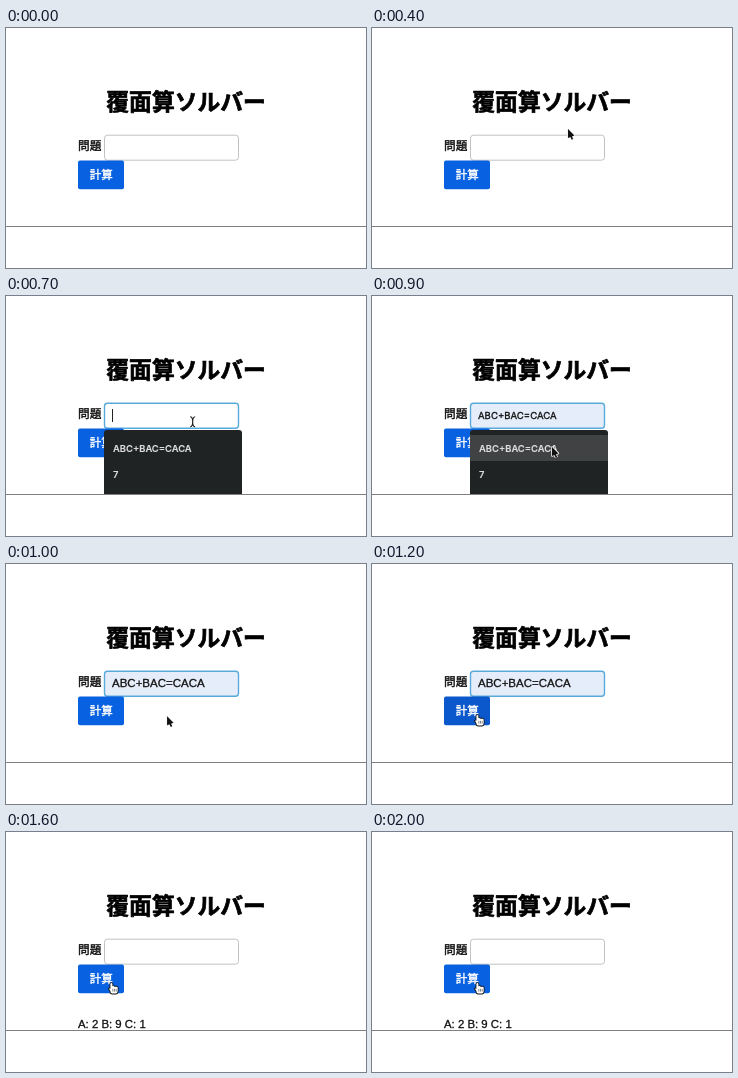
Animation of 360 by 240 pixels, one loop 2100 ms. Source, as an HTML page with a canvas:

```html
<!DOCTYPE html>
<html lang="ja">
<head>
<meta charset="utf-8">
<style>
html, body { margin: 0; width: 100%; height: 100%; overflow: hidden; background: #fff; }
canvas { display: block; width: 360px; height: 240px; }
</style>
</head>
<body>
<canvas id="stage"></canvas>
<script>
const LOOP = 2100, STEP = 100;
const canvas = document.getElementById('stage');
const ctx = canvas.getContext('2d');
const ratio = window.devicePixelRatio || 1;
canvas.width = 360 * ratio;
canvas.height = 240 * ratio;

const CJK = '"Noto Sans CJK JP", "Noto Sans CJK", sans-serif';
const ARIAL = '"Liberation Sans", Arial, sans-serif';
const UI = 'Inter, sans-serif';
const PUZZLE = 'ABC+BAC=CACA';

// the pointer rests at each stop
const stops = [
  { t: 100, x: 304, y: 138 },
  { t: 400, x: 196, y: 101 },
  { t: 600, x: 189, y: 117 },
  { t: 900, x: 180, y: 151 },
  { t: 1200, x: 107, y: 156 }
];
const ease = k => k * k * (3 - 2 * k);

function pointerAt(t) {
  const i = stops.findIndex(s => s.t > t);
  if (i < 0) return stops[stops.length - 1];
  if (i === 0) return null;
  const a = stops[i - 1], b = stops[i];
  const k = ease((t - a.t) / (b.t - a.t));
  return { x: a.x + (b.x - a.x) * k, y: a.y + (b.y - a.y) * k };
}

// a thin outline thickens the letters
function text(str, x, y, font, color, bold = 0) {
  ctx.font = font;
  ctx.fillStyle = ctx.strokeStyle = color;
  ctx.lineJoin = 'round';
  ctx.lineWidth = bold;
  if (bold) ctx.strokeText(str, x, y);
  ctx.fillText(str, x, y);
}

function box(x, y, w, h, r, fill, stroke, line = 1) {
  ctx.beginPath();
  ctx.roundRect(x, y, w, h, r);
  ctx.fillStyle = fill;
  ctx.fill();
  if (!stroke) return;
  ctx.strokeStyle = stroke;
  ctx.lineWidth = line;
  ctx.stroke();
}

function arrow() {
  const body = new Path2D('M0 0V9L6.4 6.4Z');
  const tail = new Path2D('M2.4 6L4.4 10.4');
  ctx.lineJoin = 'round';
  for (const [color, grow] of [['#fff', 1.6], ['#111', 0]]) {
    ctx.strokeStyle = ctx.fillStyle = color;
    ctx.lineWidth = 1.7 + grow;
    ctx.stroke(tail);
    ctx.lineWidth = grow || 0.1;
    ctx.stroke(body);
    ctx.fill(body);
  }
}

function beam() {
  ctx.strokeStyle = '#222';
  ctx.lineWidth = 1.1;
  ctx.beginPath();
  for (const s of [-1, 1]) {
    ctx.moveTo(-2.5, 5 * s);
    ctx.quadraticCurveTo(0, 5 * s, 0, 0);
    ctx.quadraticCurveTo(0, 5 * s, 2.5, 5 * s);
  }
  ctx.stroke();
}

function hand() {
  const shape = new Path2D();
  shape.roundRect(-2.6, -5, 2, 8, 1);
  for (let i = 0; i < 3; i++) shape.roundRect(-0.8 + 1.8 * i, -2 + 0.4 * i, 1.9, 5, 0.9);
  shape.roundRect(-2.6, 0, 7.2, 5.6, 2);
  shape.addPath(new Path2D('M-4.2 0.6L-2.4 0.8L-0.6 5L-1.4 5Z'));
  ctx.strokeStyle = '#111';
  ctx.lineWidth = 1.7;
  ctx.stroke(shape);
  ctx.fillStyle = '#fff';
  ctx.fill(shape);
  ctx.fillStyle = '#333';
  for (let i = 0; i < 3; i++) ctx.fillRect(-0.4 + 1.6 * i, 0.8, 0.6, 2.8);
}

function menu(hover) {
  box(98, 134, 138, 64, [3, 3, 0, 0], '#202324');
  if (hover) box(98, 139, 138, 26, 0, '#414244');
  [PUZZLE, '7'].forEach((row, i) =>
    text(row, 107, 156 + 25.5 * i, '600 9.4px ' + UI, '#dedede', 0.15));
}

function draw(t) {
  const focused = t >= 700 && t < 1300;
  const open = t >= 700 && t < 1000;
  const hover = t >= 900 && open;
  const solved = t >= 1400;
  const filled = t >= 900 && !solved;
  const pressed = t >= 1200 && !solved;

  ctx.setTransform(ratio, 0, 0, ratio, 0, 0);
  box(0, 0, 360, 240, 0, '#fff');

  text('覆面算ソルバー', 100.3, 82, '700 22.8px ' + CJK, '#000', 0.7);
  text('問題', 72, 122.3, '11.7px ' + CJK, '#111', 0.4);

  box(98.5, 107.2, 134, 25, 3, filled ? '#e5edfa' : '#fff',
    focused ? '#58aadb' : '#c2c2c2', focused ? 1.4 : 1);
  box(72, 132.6, 46, 28.6, 2, pressed ? '#0b58cc' : '#0861e0');
  text('計算', 83.7, 151.2, '11.5px ' + CJK, '#fff', 0.4);

  if (filled) {
    const font = open ? '9.6px ' + UI : '11.5px ' + ARIAL;
    text(PUZZLE, 106, 123, font, '#111', 0.3);
  } else if (focused) {
    box(106, 113, 1, 13, 0, '#222');
  }
  if (open) menu(hover);
  if (solved) text('A: 2 B: 9 C: 1', 72, 195.5, '11.4px ' + ARIAL, '#111', 0.3);

  box(0, 198, 360, 1, 0, '#808080');

  const p = pointerAt(t);
  if (!p) return;
  ctx.save();
  ctx.translate(p.x, p.y);
  if (t >= 1200) hand();
  else if (t >= 500 && t < 800) beam();
  else arrow();
  ctx.restore();
}

function tick(now) {
  draw(Math.floor((now % LOOP) / STEP) * STEP);
  requestAnimationFrame(tick);
}
draw(0);
requestAnimationFrame(tick);
</script>
</body>
</html>
```
